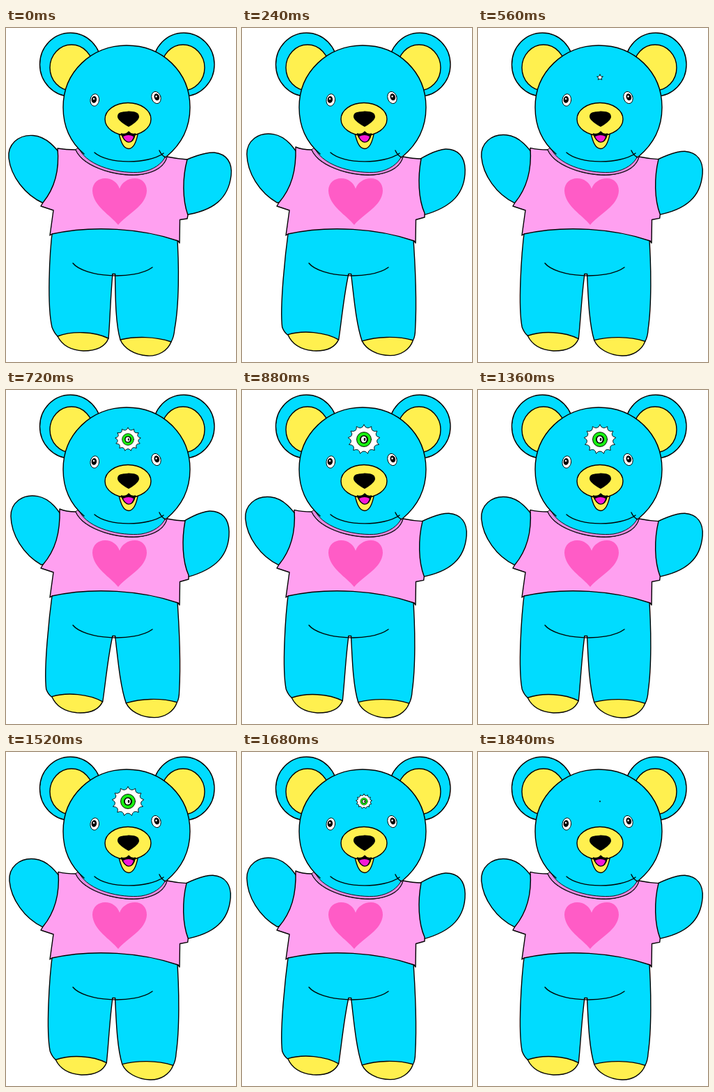
Animation of 330x480 px, one loop 1.92 s. Source, as an HTML page:

```html
<!DOCTYPE html>
<html lang="en">
<head>
<meta charset="utf-8">
<title>Waving bear</title>
<style>
  html, body { margin: 0; width: 100%; height: 100%; overflow: hidden; background: #fff; }
  svg { display: block; width: 330px; height: 480px; }
  path, ellipse, circle { stroke: #000; stroke-width: 1.4; stroke-linejoin: round; stroke-linecap: round; }
  .c { fill: #00dcff; }
  .y { fill: #fff04f; }
  .p { fill: #ffa0f0; }
  .w { fill: #fff; }
  .k { fill: #000; }
  .line { fill: none; }
  .flat { stroke: none; }
  .thin { stroke-width: .9; }
</style>
</head>
<body>
<svg viewBox="0 0 330 480">
  <path id="legL" class="c"/>
  <path id="footL" class="y" d="M74 443C95 435 127 436 147 446C142 459 128 464 111 464C92 463 80 455 74 443Z"/>
  <path id="legR" class="c"/>
  <path id="footR" class="y" d="M164 448C185 443 214 443 237 451C232 464 218 472 203 471C184 470 169 460 164 448Z"/>
  <path class="c flat" d="M68 285H243L240 330L215 353H95L70 330Z"/>
  <path class="line" d="M153 353.500H156.500"/>
  <path class="line" d="M96 338C112 358 184 363 210 344"/>

  <path id="armL" class="c" d="M90 196C76 179 62 156 39 154.500C17 153 2 168 4 187C7 213 27 240 54 252L90 245"/>
  <path id="armR" class="c" d="M240 198C262 187 283 178 299 179C317 181 325 194 323 212C319 245 298 263 255 269L240 245"/>

  <path id="shirt" class="p"/>
  <path class="thin" d="M100 175C112 202 165 215 196 210C218 206 228 196 231 185L222 175L108 170Z" fill="#e48be0"/>
  <path class="c thin" d="M105 174C118 200 165 210 194 207C212 204 224 195 229 184L215 165L112 165Z"/>
  <path class="flat" fill="#ff5cc6" d="M161 283C150 269 125 256 124 234C124 222 133 216 142 216C152 216 160 222 163 231C166 222 175 216 185 216C195 216 202 223 202 234C201 256 174 267 161 283Z"/>

  <ellipse class="c" cx="92.500" cy="52.500" rx="44" ry="45.500"/>
  <ellipse class="y" cx="94" cy="57" rx="31" ry="33"/>
  <ellipse class="c" cx="255" cy="52.500" rx="44" ry="45.500"/>
  <ellipse class="y" cx="254" cy="57" rx="31" ry="33"/>
  <path class="c flat" d="M112 181C91 163 82 139 82 114C82 63 123 25 173 25C224 25 264 63 264 114C264 142 253 166 230 184Q170 205 112 181Z"/>
  <path class="line" d="M112 181C91 163 82 139 82 114C82 63 123 25 173 25C224 25 264 63 264 114C264 142 253 166 230 185"/>
  <path class="line" d="M127 179C146 196 204 196 226 180M220 176Q223 183 229 186"/>

  <g transform="translate(127.300 103.500) rotate(8)">
    <ellipse class="w thin" rx="6.300" ry="8.800"/>
    <ellipse class="k flat" cx="-1" cy="-.5" rx="3.700" ry="5"/>
    <circle class="w flat" cx="-1.500" cy="-1.500" r="1.300"/>
  </g>
  <g transform="translate(215.500 100) rotate(-18)">
    <ellipse class="w thin" rx="6.500" ry="8.800"/>
    <ellipse class="k flat" cx="1" cy="-.5" rx="3.700" ry="5"/>
    <circle class="w flat" cx=".5" cy="-1.500" r="1.300"/>
  </g>

  <path class="y" d="M161 148C164 160 167 173.500 176 173.500C184 173.500 188 160 190 148Z"/>
  <ellipse class="y" cx="175" cy="131" rx="33" ry="23.500"/>
  <path class="k" d="M165.500 152Q172 154 176 149Q180 154 185.500 152Q183 164 176 164Q169 163 165.500 152Z"/>
  <path class="flat" fill="#f418d8" d="M168 156Q176 152 183 156Q181 163.500 176 163.500Q171 162.500 168 156Z"/>
  <path class="k flat" d="M160 128C160 119 169 121 176 119.500C183 120 191 120 191 128C190 133 182 139 176 142C170 139 161 133 160 128Z"/>

  <g id="third">
    <path id="burst" class="w thin" vector-effect="non-scaling-stroke"/>
    <g id="iris">
      <circle fill="#18f010" r="10.500" class="thin"/>
      <circle class="k flat" r="6"/>
      <ellipse class="w flat" cx="-.2" rx="4" ry="4.500"/>
      <ellipse class="k flat" cx="1" rx="1.300" ry="2.300"/>
    </g>
  </g>
</svg>
<script>
const STEP = 80, STEPS = 24;
const $ = id => document.getElementById(id);

// Eye size at each step, zero while it is hidden.
const eyeSize = [0, 0, 0, 0, 0, 0, .04, .2, .5, .8, 1, 1, 1, 1, 1, 1, 1, 1, 1, 1, .8, .5, .2, .03];

function burst(points, outer, inner) {
  const at = (k, r) => {
    const a = (k / points) * 2 * Math.PI - Math.PI / 2;
    return `${(r * Math.cos(a)).toFixed(2)} ${(r * .91 * Math.sin(a)).toFixed(2)}`;
  };
  let d = `M${at(0, outer)}`;
  for (let k = 0; k < points; k++) d += `Q${at(k + .5, inner)} ${at(k + 1, outer)}`;
  return d + 'Z';
}
const small = burst(5, 23, 4), large = burst(13, 23, 15);

function turn(id, angle, x, y) {
  $(id).setAttribute('transform', `rotate(${angle} ${x} ${y})`);
}

function shape(id, d) {
  $(id).setAttribute('d', d);
}

// The hips stay put while the legs bend outwards with the feet.
function drawLegs(out) {
  const d = 8.3 * out, tilt = 2 * out;
  shape('legL', `M67 288C62 325 ${59 - .6 * d} 400 ${66 - d} 430Q${69 - d} 438 ${74 - d} ${443 - tilt}
    L${147 - d} ${446 + tilt}C${149 - .8 * d} 425 ${150 - .5 * d} 385 153 353L150 290`);
  shape('legR', `M245 290C249 345 ${248 + .3 * d} 400 ${242 + .8 * d} 432Q${241 + .9 * d} 444 ${237 + d} ${451 - tilt}
    L${164 + d} ${448 + tilt}C${157 + .8 * d} 425 ${157 + .4 * d} 385 156.5 353L162 290`);
  turn('footL', 3.3 * out, 110, 300);
  turn('footR', -3.2 * out, 201, 300);
}

function drawShirt(out) {
  const left = `${74 + 3 * out} ${173 - 2 * out}`;
  const right = `${260 - 3 * out} ${189 - out}`;
  shape('shirt', `M${left}Q86 175 100 175C112 202 165 215 196 210C218 206 228 196 231 185
    Q246 188 ${right}C${253 - out} 215 253 246 ${261 + out} ${269 - 3 * out}L${260 + 2 * out} ${274 - 2 * out}
    L249.5 275.5L249 309L247 306C195 288 125 283 66 296L63 298L68 262L50 256L53 251
    C${70 + out} 230 ${77 + out} 205 ${left}Z`);
}

function draw(n) {
  const out = 1 - Math.abs(n % 6 - 3) / 3;
  drawLegs(out);
  drawShirt(out);
  turn('armL', 5.5 * out, 62, 215);
  turn('armR', -7.5 * out, 257, 230);

  const s = eyeSize[n];
  $('third').style.display = s ? '' : 'none';
  $('third').setAttribute('transform', `translate(175 71) scale(${s})`);
  shape('burst', s < .3 ? small : large);
  $('iris').style.display = s < .3 ? 'none' : '';
}

const start = performance.now();
function tick() {
  draw(Math.floor((performance.now() - start) / STEP) % STEPS);
  requestAnimationFrame(tick);
}
tick();
</script>
</body>
</html>
```
